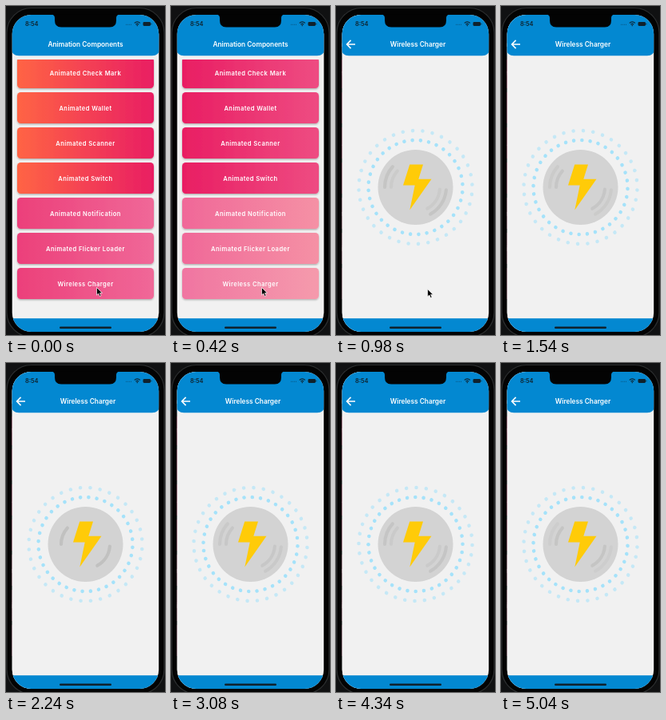
These frames come from a looping animation (199 by 412 pixels, 5.18 s). An HTML page:

```html
<!DOCTYPE html>
<html lang="en">
<head>
<meta charset="utf-8">
<style>
html, body { margin: 0; width: 100%; height: 100%; overflow: hidden; background: #101112; }
svg { display: block; width: 199px; height: 412px; }
text { font-family: Inter, Roboto, sans-serif; font-weight: 600; fill: #fff; }
.title { font-size: 8.3px; text-anchor: middle; }
.label { font-size: 7.6px; text-anchor: middle; letter-spacing: .42px; }
</style>
</head>
<body>
<svg viewBox="0 0 199 412">
  <defs>
    <clipPath id="screen"><rect x="7.7" y="11" width="183.5" height="397" rx="24"/></clipPath>
    <clipPath id="scroller"><rect x="8" y="67" width="183" height="325"/></clipPath>
    <linearGradient id="warm"><stop/><stop offset="1"/></linearGradient>
    <linearGradient id="rose"><stop/><stop offset="1"/></linearGradient>
    <filter id="shadow" x="-5%" y="-10%" width="110%" height="130%">
      <feDropShadow dx="0" dy="1.2" stdDeviation="1" flood-opacity=".3"/>
    </filter>
    <g id="page">
      <rect x="7" y="11" width="185" height="397" fill="#f1f1f1"/>
      <path d="M7 11H192V54Q191.5 62.3 183 62.3H16Q7.5 62.3 7 54Z" fill="#0388d1"/>
      <rect x="7" y="391.2" width="185" height="17" fill="#0388d1"/>
    </g>
  </defs>
  <rect width="199" height="412" fill="#101112"/>
  <rect x="1" y="2.5" width="197" height="412" rx="31" fill="#030303" stroke="#2d2f30" stroke-width="1.2"/>
  <g clip-path="url(#screen)">
    <g id="list">
      <use href="#page"/>
      <text class="title" x="99.5" y="51">Animation Components</text>
      <g id="buttons" clip-path="url(#scroller)"></g>
    </g>
    <g id="charger">
      <use href="#page"/>
      <path d="M24 48H14M18.6 42.9L13.6 48L18.6 53.1" fill="none" stroke="#fff" stroke-width="1.6"/>
      <text class="title" x="102.5" y="51">Wireless Charger</text>
      <g transform="translate(99.5 227)">
        <g id="rings"></g>
        <circle r="47" fill="#d3d3d3"/>
        <g id="inner" fill="none" stroke="#c1c1c0" stroke-width="4.2" stroke-linecap="round"></g>
        <g id="outer" fill="none" stroke="#c1c1c0" stroke-width="4.2" stroke-linecap="round"></g>
        <path d="M-7.3 -28.5H9.5L3.8 -10.3H20L-7.2 28.5L-.8 -2.5H-15.5Z" fill="#ffcb08"/>
      </g>
    </g>
    <rect x="67" y="401.5" width="65" height="2.4" rx="1.2" fill="#10222d"/>
  </g>
  <path d="M57 10.5Q61 11 61 15V18Q61 26.5 69 26.5H130Q138 26.5 138 18V15Q138 11 142 10.5Z" fill="#030303"/>
  <text x="24" y="25.2" font-size="7.4" style="fill:#10222d">8:54</text>
  <g fill="#10222d">
    <path d="M150 23.3H157" stroke="#10222d" stroke-width="1" stroke-dasharray="1 1" opacity=".5"/>
    <path d="M160.7 21.4Q164.3 18.4 167.9 21.4M162.4 23.1Q164.3 21.5 166.2 23.1" fill="none" stroke="#10222d" stroke-width="1.2"/>
    <circle cx="164.3" cy="24.5" r=".8"/>
    <rect x="171.5" y="20" width="9.5" height="5" rx="1.4"/>
    <rect x="181.5" y="21.6" width=".8" height="1.8"/>
  </g>
  <path id="cursor" d="M0 0V9.5L2.2 7.5L3.8 11L5.5 10.2L4 6.9H7Z" fill="#000" stroke="#fff" stroke-width=".7"/>
</svg>
<script>
const LOOP = 5180, STEP = 140;
const $ = id => document.getElementById(id);
const clamp = x => Math.max(0, Math.min(1, x));

function add(parent, tag, attrs, text = '') {
  const node = document.createElementNS('http://www.w3.org/2000/svg', tag);
  for (const key in attrs) node.setAttribute(key, attrs[key]);
  node.textContent = text;
  return parent.appendChild(node);
}

const labels = ['Check Mark', 'Wallet', 'Scanner', 'Switch', 'Notification', 'Flicker Loader']
  .map(name => 'Animated ' + name).concat('Wireless Charger');
const buttons = labels.map((label, i) => {
  const y = 64 + i * 44, g = add($('buttons'), 'g', {});
  add(g, 'rect', { x: 14, y, width: 171, height: 39, rx: 4.5, filter: 'url(#shadow)',
    fill: `url(#${i < 4 ? 'warm' : 'rose'})` });
  add(g, 'text', { class: 'label', x: 99.5, y: y + 22.7 }, label);
  return g;
});

function addRing(radius, opacity, offset) {
  for (let i = 0; i < 36; i++)
    add($('rings'), 'circle', { cx: 0, cy: -radius, r: 2.3, fill: '#a5e2fa', opacity,
      transform: `rotate(${i * 10 + offset})` });
}
addRing(59, 1, -1);
addRing(71, .58, 0);

function addArc(parent, radius, from, to) {
  const point = deg => [Math.cos(deg * Math.PI / 180) * radius, Math.sin(deg * Math.PI / 180) * radius];
  add(parent, 'path', { d: `M${point(from)}A${radius} ${radius} 0 0 1 ${point(to)}` });
}
for (const [id, radius] of [['inner', 30.5], ['outer', 38.5]]) {
  addArc($(id), radius, 180, 222);
  addArc($(id), radius, 5, 61);
}

const mix = (a, b, p) => `rgb(${a.map((v, i) => Math.round(v + (b[i] - v) * p))})`;
const ORANGE = [255, 100, 68], PINK = [233, 30, 99], ROSE = [236, 64, 122];
const BLUSH = [240, 104, 152], SALMON = [245, 145, 165];

function setGradient(id, [left, right]) {
  const stops = $(id).children;
  stops[0].setAttribute('stop-color', left);
  stops[1].setAttribute('stop-color', right);
}

function draw(t) {
  const shift = clamp(t / 420);
  setGradient('warm', [mix(ORANGE, PINK, shift), mix(PINK, [238, 76, 130], shift)]);
  setGradient('rose', [mix(ROSE, BLUSH, shift), mix(BLUSH, SALMON, shift)]);
  buttons[6].setAttribute('opacity', 1 - .1 * clamp((t - 200) / 150));

  const slide = 1 - (1 - clamp((t - 480) / 460)) ** 3;
  $('list').setAttribute('transform', `translate(${-55 * slide} 0)`);
  $('charger').setAttribute('transform', `translate(${184 * (1 - slide)} 0)`);

  $('rings').setAttribute('transform', `rotate(${7.2 - (t - 980) * 360 / 14000})`);
  const phase = ((t - 2240) / 3300 % 1 + 1) % 1;
  const wave = 1 - Math.abs(2 * phase - 1);
  $('inner').setAttribute('opacity', 1 - .75 * wave);
  $('outer').setAttribute('opacity', wave);

  $('cursor').setAttribute('transform', t < 700 ? 'translate(113.5 352.5)' : 'translate(114.6 354.5)');
  $('cursor').setAttribute('visibility', t < 1540 ? 'visible' : 'hidden');
}

const start = performance.now();
function tick() {
  const t = (performance.now() - start) % LOOP;
  draw(Math.floor(t / STEP) * STEP);
  requestAnimationFrame(tick);
}
tick();
</script>
</body>
</html>
```
